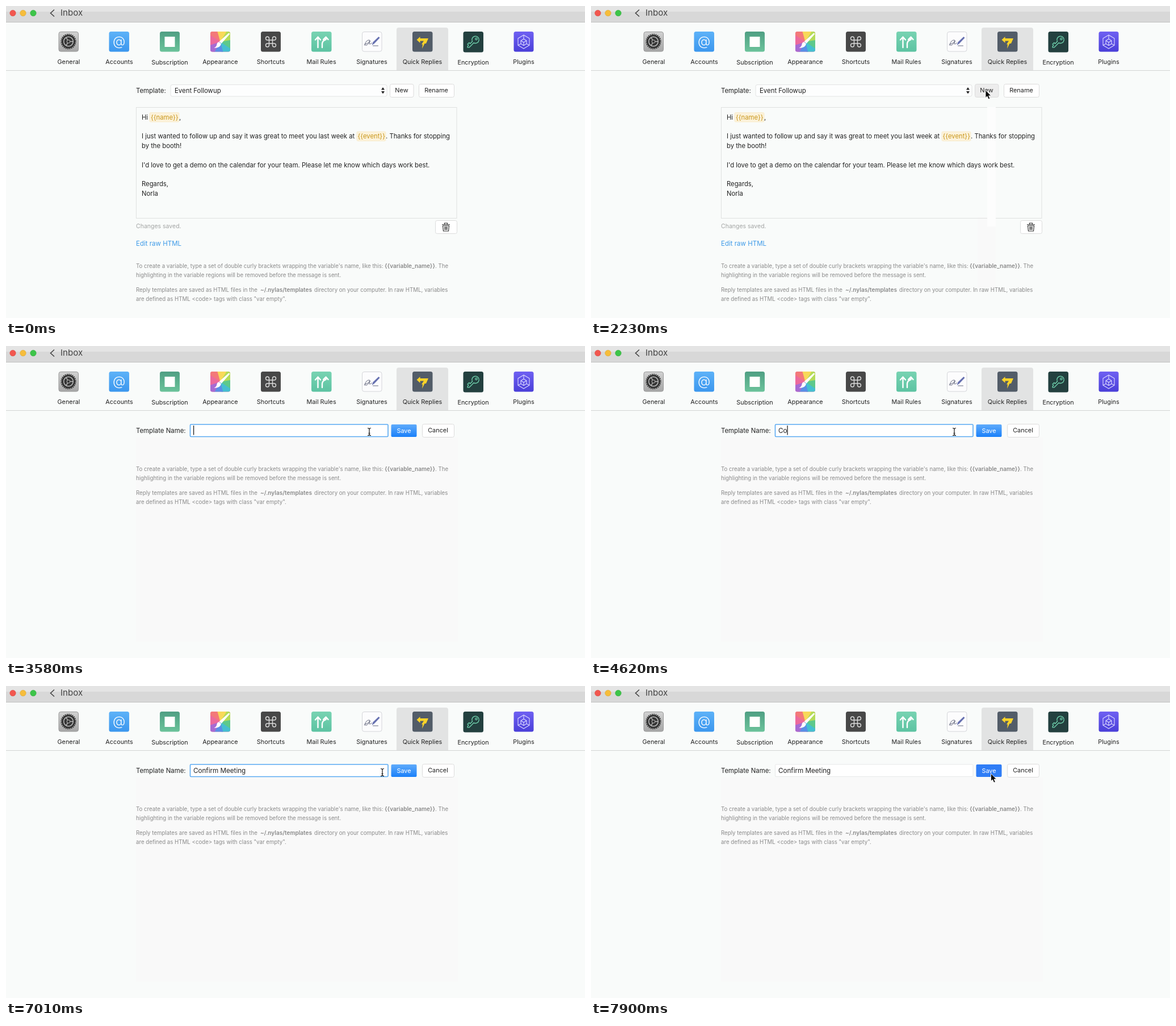
Animation of 1020x549 px, one loop 8 s. Source, as an HTML page:

```html
<!DOCTYPE html>
<html lang="en">
<head>
<meta charset="utf-8">
<title>Quick replies</title>
<style>
html, body { margin: 0; width: 100%; height: 100%; overflow: hidden; background: #f9fbfa; }
svg { display: block; width: 100vw; height: 100vh; }
text { font-family: Inter, "Open Sans", sans-serif; font-size: 11.28px; fill: #222; white-space: pre; }
.tabs text { font-size: 10.85px; text-anchor: middle; }
.row text { font-size: 11.4px; }
.row .label { font-size: 10.9px; text-anchor: middle; }
.help text { font-size: 9.7px; fill: #8a8a8a; }
.help .strong { font-size: 10.05px; font-weight: 600; }
.var { fill: #c8961a; }
.mark { fill: #fcf2da; stroke: #f6e6bd; stroke-width: .6; }
.btn { fill: #fff; stroke: #dcdcdc; }
.line { fill: none; stroke: #fff; stroke-width: 1.6; stroke-linejoin: round; stroke-linecap: round; }
.input { fill: #fff; stroke: #e7e8e8; }
.fresh .input, .fresh .btn { fill: #f9f9f9; }
.focus .input { stroke: #5aaaf2; stroke-width: 1.6; }
.save { fill: url(#blue); }
.pressed .save { fill: #2f7df6; }
.pressed .new { fill: #ededed; }
</style>
</head>
<body>
<svg viewBox="0 0 1020 549" preserveAspectRatio="none">
  <defs>
    <linearGradient id="blue" x2="0" y2="1"><stop stop-color="#5fabfb"/><stop offset="1" stop-color="#1a80fa"/></linearGradient>
    <linearGradient id="gray" x2="0" y2="1"><stop stop-color="#d2d2d2"/><stop offset="1" stop-color="#a6a6a6"/></linearGradient>
    <linearGradient id="sky" x2="0" y2="1"><stop stop-color="#5db2f8"/><stop offset="1" stop-color="#3c97ee"/></linearGradient>
    <linearGradient id="green" x2="0" y2="1"><stop stop-color="#4f9f83"/><stop offset="1" stop-color="#6cc39b"/></linearGradient>
    <linearGradient id="mint" x2="0" y2="1"><stop stop-color="#78d3b2"/><stop offset="1" stop-color="#5dc3a2"/></linearGradient>
    <linearGradient id="violet" x2="0" y2="1"><stop stop-color="#6f60f2"/><stop offset="1" stop-color="#4a3fd8"/></linearGradient>
    <clipPath id="tileClip"><rect x=".5" width="35" height="35.500" rx="3.500"/></clipPath>
  </defs>

  <rect width="1020" height="549" fill="#f9fbfa"/>
  <rect width="1020" height="28" fill="#d8d8d8"/>
  <rect width="1020" height="10" fill="#e4e4e4"/>
  <rect y="28" width="1020" height="1" fill="#c2c2c2"/>
  <g stroke-width=".6">
    <circle cx="12" cy="12.500" r="5.200" fill="#f2574f" stroke="#d8473f"/>
    <circle cx="30" cy="12.500" r="5.200" fill="#f6bd3b" stroke="#dca52f"/>
    <circle cx="48" cy="12.500" r="5.200" fill="#3dc549" stroke="#32aa3c"/>
  </g>
  <path d="M85 6.500L78.500 12.500L85 18.500" fill="none" stroke="#444" stroke-width="1.600"/>
  <text x="96" y="17" style="font-size:15.1px;fill:#444">Inbox</text>

  <path d="M688 113V42q0-4 4-4h83q4 0 4 4v71z" fill="#e2e3e3"/>
  <rect y="113" width="1020" height="1" fill="#d3d4d4"/>

  <g class="tabs">
    <text x="110.500" y="101.500">General</text>
    <text x="199.500" y="101.500">Accounts</text>
    <text x="288.500" y="102.500">Subscription</text>
    <text x="377.500" y="101.500">Appearance</text>
    <text x="466.500" y="101.500">Shortcuts</text>
    <text x="555.500" y="101.500">Mail Rules</text>
    <text x="644.500" y="101.500">Signatures</text>
    <text x="733.500" y="101.500">Quick Replies</text>
    <text x="823" y="103">Encryption</text>
    <text x="912" y="101.500">Plugins</text>
  </g>

  <g transform="translate(92 45)">
    <rect x="1" y=".5" width="34.500" height="34.500" rx="3.500" fill="url(#gray)" stroke="#999"/>
    <circle cx="18" cy="17.500" r="12" fill="#343434"/>
    <circle cx="18" cy="17.500" r="12.800" fill="none" stroke="#343434" stroke-width="2" stroke-dasharray="1.700 1.650"/>
    <circle cx="18" cy="17.500" r="8.300" fill="none" stroke="#bbb" stroke-width="1.500"/>
    <path d="M18 17.500H26M18 17.500L14 10.500M18 17.500L14 24.500" stroke="#bbb" stroke-width="1.500"/>
    <circle cx="18" cy="17.500" r="2.800" fill="#343434" stroke="#bbb"/>
  </g>
  <g transform="translate(181 45)">
    <rect x=".5" width="35.500" height="35.500" rx="3.500" fill="url(#sky)"/>
    <text x="18.200" y="25" text-anchor="middle" style="font-size:23px;font-weight:300;fill:#fff">@</text>
  </g>
  <g transform="translate(270.500 45)">
    <rect x=".5" width="35" height="35.500" rx="3.500" fill="url(#green)"/>
    <rect x="9" y="9" width="18" height="18" fill="#fff"/>
  </g>
  <g transform="translate(359.500 45)" clip-path="url(#tileClip)">
    <rect width="36" height="36" fill="#ec6a9c"/>
    <path d="M18 18L0 6V0H15z" fill="#f3797a"/>
    <path d="M18 18L13 0H31z" fill="#f8d95a"/>
    <path d="M18 18L29 0H36V17z" fill="#b4dc58"/>
    <path d="M18 18L36 15V32z" fill="#5dc98c"/>
    <path d="M18 18L36 30V36H20z" fill="#45bfd0"/>
    <path d="M18 18L23 36H6z" fill="#5a8fe6"/>
    <path d="M18 18L8 36H0V24z" fill="#a76bd2"/>
    <path d="M33 2.500L35 4L20 21L16 17.500z" fill="#fff"/>
    <path d="M15.500 18L19.500 21.500Q18 29 7 29Q12 26 12 22Q12.500 19 15.500 18z" fill="#fff"/>
  </g>
  <g transform="translate(448.500 45)">
    <rect x=".5" width="35" height="35.500" rx="3.500" fill="#484848"/>
    <path class="line" style="stroke:#ddd;stroke-width:1.4" d="M15 15H21V21H15zM15 15H12A3 3 0 1 1 15 12zM21 15V12A3 3 0 1 1 24 15zM21 21H24A3 3 0 1 1 21 24zM15 21V24A3 3 0 1 1 12 21z"/>
  </g>
  <g transform="translate(537.500 45)">
    <rect x=".5" width="35.500" height="35.500" rx="3.500" fill="url(#mint)"/>
    <path class="line" style="stroke-width:2.4" d="M12 28V11M7.500 14.500L12 9.500L16.500 14.500M19.500 28V21Q20 16 26 14V10.500M21.500 14L26 9.500L30 14"/>
  </g>
  <g transform="translate(626.500 45)">
    <rect x="1" y=".5" width="34.500" height="34.500" rx="3.500" fill="#fcfcfd" stroke="#d5d6da"/>
    <path class="line" style="stroke:#666a80;stroke-width:1" d="M5 24Q8 14 14 15Q16 18 10 23Q6 26 6 22Q11 22 15 16Q12 23 15 22L18 20M20 25H29"/>
    <path d="M18 24L20 18.500L30 9L32 11L22.500 21z" fill="#6670b0"/>
  </g>
  <g transform="translate(715.500 45)">
    <rect x=".5" width="35.500" height="35.500" rx="3.500" fill="#525c68"/>
    <path d="M8 14.500L14 9V12H28.500L24.500 21H22L17.500 30L18.500 22.500H16.500L20.500 16.500H14V20z" fill="#fbd329"/>
  </g>
  <g transform="translate(805 45)">
    <rect x=".5" width="35.500" height="36.500" rx="3.500" fill="#23403f"/>
    <g transform="rotate(45 18 18)">
      <path class="line" style="stroke:#6fd0ac;stroke-width:1.4" d="M16.500 18.500A6.200 6.200 0 1 1 20 18.500V30L18 32L16.500 30V28H14V24H16.500z"/>
      <circle cx="18.200" cy="10.500" r="1.700" fill="none" stroke="#6fd0ac" stroke-width="1.200"/>
    </g>
  </g>
  <g transform="translate(894 45)">
    <rect x=".5" width="35" height="35.500" rx="3.500" fill="url(#violet)"/>
    <path class="line" style="stroke:#dcd9ff;stroke-width:1.1" d="M18 6L28 12V24L18 30L8 24V12zM18 13L23 16V21.500L18 24.500L13 21.500V16zM13 16L18 19L23 16M18 19V24.500M18 6V13M8 24L13 21.500M28 24L23 21.500"/>
  </g>

  <g id="editor">
    <rect id="wideTrail" x="681" y="371" width="32" height="125" fill="#f9f9f9"/>
    <g class="row">
      <text x="229" y="152.500">Template:</text>
      <rect x="290" y="138.500" width="381" height="20.500" rx="3" fill="#fdfefe" stroke="#e3e4e4"/>
      <text x="297" y="152.500">Event Followup</text>
      <path d="M661 147.500L664 143L667 147.500zM661 150L664 154.500L667 150z" fill="#222"/>
      <rect class="btn new" x="676.500" y="137.500" width="41.500" height="23" rx="3"/>
      <text class="label" x="697" y="152">New</text>
      <rect class="btn" x="727.500" y="137.500" width="62" height="23" rx="3"/>
      <text class="label" x="758" y="152">Rename</text>
    </g>
    <rect x="229.500" y="178.500" width="564.500" height="195" fill="none" stroke="#dfe1e0"/>
    <rect id="trail" x="698" y="178" width="15" height="210" fill="#fdfdfd"/>
    <text x="239" y="199.500">Hi</text>
    <rect class="mark" x="253" y="187.500" width="52" height="16.500" rx="2"/>
    <text class="var" x="255" y="199.500">{{name}}</text>
    <text x="305" y="199.500">,</text>
    <text x="239" y="233">I just wanted to follow up and say it was great to meet you last week at</text>
    <rect class="mark" x="618" y="221" width="51" height="16.500" rx="2"/>
    <text class="var" x="619.500" y="233">{{event}}</text>
    <text x="669" y="233">. Thanks for stopping</text>
    <text x="239" y="249.500">by the booth!</text>
    <text x="239" y="283.500">I'd love to get a demo on the calendar for your team. Please let me know which days work best.</text>
    <text x="239" y="317">Regards,</text>
    <text x="239" y="333.500">Norla</text>
    <text x="229" y="391" style="font-size:10.5px;fill:#a3a5a4">Changes saved.</text>
    <rect class="btn" x="756.500" y="377.500" width="38" height="23" rx="3"/>
    <path d="M768 384.500H782M772.500 384V382H777.500V384M769.500 386.500L770.500 396H779.500L780.500 386.500zM773 388V394M775 388V394M777 388V394" fill="none" stroke="#333" stroke-width="1.200"/>
    <text x="229" y="422" style="font-size:11.5px;fill:#3f9be8">Edit raw HTML</text>
  </g>

  <g id="form" class="row">
    <rect x="229" y="161" width="567" height="359" fill="#f9f9f9"/>
    <text x="229" y="152.500">Template Name:</text>
    <rect class="input" x="324.500" y="138" width="348.500" height="21.500" rx="1.500"/>
    <text id="typed" x="330" y="152.500" style="font-size:11.65px"></text>
    <rect id="caret" y="140" width="1.200" height="16.500" fill="#111"/>
    <rect class="save" x="678.500" y="138" width="45" height="22" rx="2"/>
    <text class="label" x="701" y="152.500" style="fill:#fff">Save</text>
    <rect class="btn" x="733.500" y="137.500" width="56" height="23" rx="3"/>
    <text class="label" x="761" y="152">Cancel</text>
  </g>

  <g id="help" class="help">
    <text x="229" y="461">To create a variable, type a set of double curly brackets wrapping the variable's name, like this:</text>
    <text class="strong" x="667" y="461">{{variable_name}}</text>
    <text x="756" y="461">. The</text>
    <text x="229" y="477">highlighting in the variable regions will be removed before the message is sent.</text>
    <text x="229" y="502.500">Reply templates are saved as HTML files in the</text>
    <text class="strong" x="448" y="502.500">~/.nylas/templates</text>
    <text x="543" y="502.500">directory on your computer. In raw HTML, variables</text>
    <text x="229" y="518.500">are defined as HTML &lt;code&gt; tags with class "var empty".</text>
  </g>

  <path id="arrow" d="M0 0V13.500L3 10.800L5.300 16L7.800 15L5.600 9.900H9.800z" fill="#000" stroke="#fff" stroke-width=".9"/>
  <path id="beam" d="M-3-6.500Q0-6.500 0-4.500Q0-6.500 3-6.500M0-4.500V4.500M-3 6.500Q0 6.500 0 4.500Q0 6.500 3 6.500M-1.500 2.500H1.500" fill="none" stroke="#111" stroke-width="1.200"/>
</svg>
<script>
const LOOP = 8000, NAME = "Confirm Meeting";
const PRESS_NEW = 2230, OPEN_FORM = 2380, FOCUS = 3580, PRESS_SAVE = 7900;
const el = id => document.getElementById(id);
const show = (id, on) => { el(id).style.display = on ? "" : "none"; };

// Each track holds [start time, ...value]; values change in hard steps.
const pointer = [
  [0, "none", 0, 0],
  [750, "arrow", 682, 479], [900, "arrow", 701, 371], [1040, "arrow", 699, 161],
  [1190, "arrow", 699, 160], [1340, "arrow", 699, 159], [1480, "arrow", 698.5, 158],
  [1630, "arrow", 697, 152], [1780, "arrow", 695, 148],
  [3130, "arrow", 684, 149], [3280, "beam", 655, 151], [3430, "beam", 640, 151],
  [7010, "beam", 663, 152], [7160, "arrow", 688, 153], [7310, "arrow", 704, 154],
  [7460, "arrow", 710, 154], [7600, "arrow", 707, 154], [7750, "arrow", 704.5, 154]
];
const typing = [
  [0, 0], [4470, 1], [4620, 2], [4770, 3], [4920, 4], [5070, 5], [5210, 7], [5360, 8],
  [5510, 9], [5660, 10], [5810, 11], [6110, 12], [6260, 14], [6410, 15]
];
const caret = [[0, false], [FOCUS, true], [4020, false], [4470, true], [7010, false], [7460, true], [PRESS_SAVE, false]];
const at = (track, t) => track.filter(step => step[0] <= t).pop();

function draw(t) {
  const inForm = t >= OPEN_FORM;
  show("editor", !inForm);
  show("form", inForm);
  el("help").setAttribute("transform", `translate(0 ${inForm ? -241 : 0})`);
  show("wideTrail", t >= 900);
  show("trail", t >= 1040);
  el("editor").classList.toggle("pressed", t >= PRESS_NEW);

  const form = el("form").classList;
  form.toggle("fresh", t < FOCUS);
  form.toggle("focus", t >= FOCUS && t < PRESS_SAVE);
  form.toggle("pressed", t >= PRESS_SAVE);

  el("typed").textContent = NAME.slice(0, at(typing, t)[1]);
  const caretOn = at(caret, t)[1];
  show("caret", caretOn);
  if (caretOn) el("caret").setAttribute("x", 330 + el("typed").getComputedTextLength());

  const [, kind, x, y] = at(pointer, t);
  for (const id of ["arrow", "beam"]) {
    show(id, id === kind);
    el(id).setAttribute("transform", `translate(${x} ${y})`);
  }
}

const start = performance.now();
function tick() {
  draw((performance.now() - start) % LOOP);
  requestAnimationFrame(tick);
}
tick();
</script>
</body>
</html>
```
